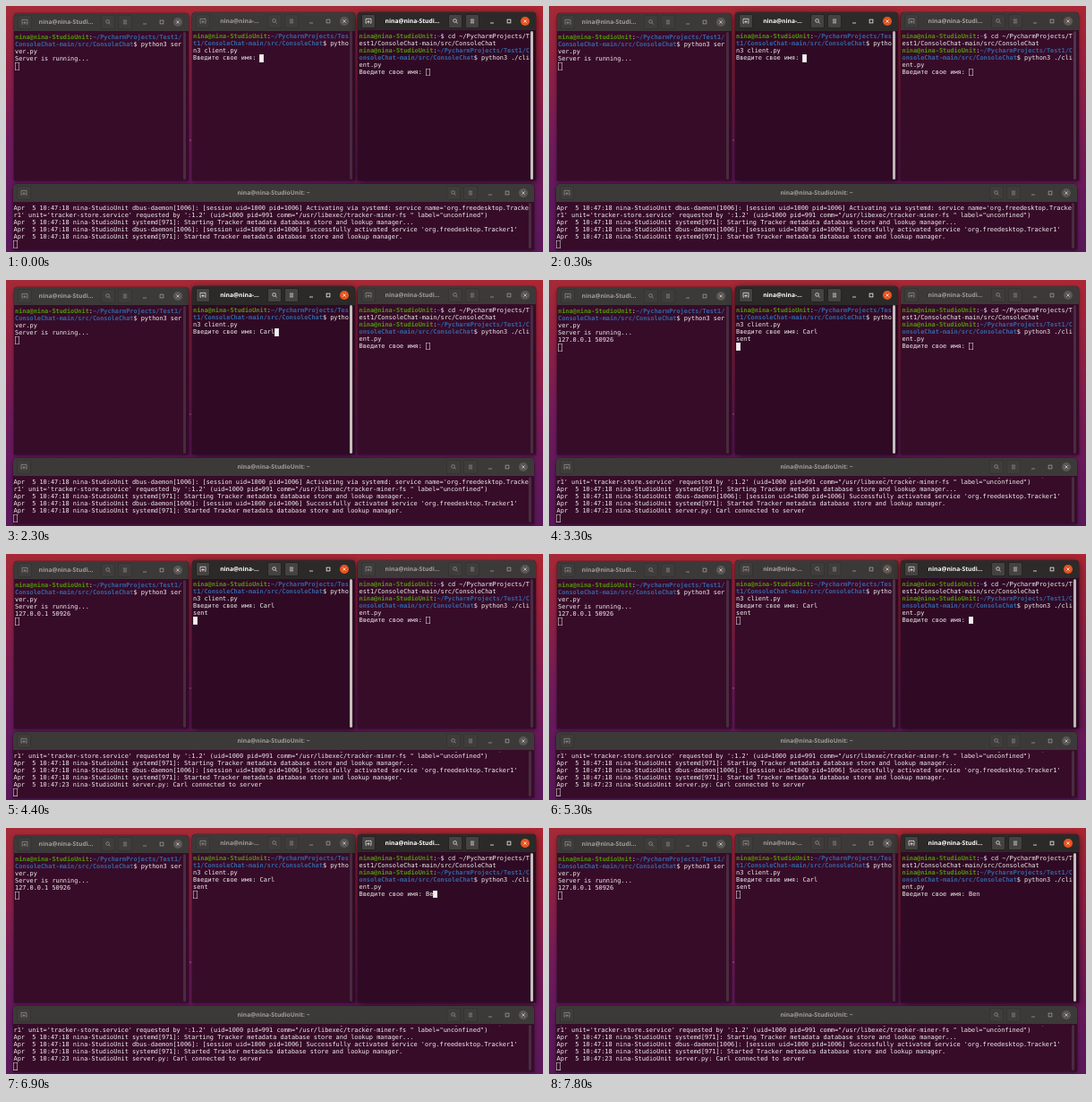
Recreate the animation shown at these times as an HTML page. Size 600 by 275 pixels, loop 8 s.

```html
<!DOCTYPE html>
<html lang="ru">
<head>
<meta charset="utf-8">
<title>Console chat</title>
<style>
@property --a { syntax: "<number>"; inherits: true; initial-value: 0; }
* { box-sizing: border-box; }
html, body { margin: 0; width: 100%; height: 100%; overflow: hidden; }
body {
  --cw: 4.142px; --lh: 8.05px; --loop: 8s step-end infinite;
  background:
    radial-gradient(circle at 206px 150px, #b04a88 0 .6px, transparent 1px),
    radial-gradient(circle at 100% 0, #c01c2844, transparent 260px),
    linear-gradient(#a52a36, #8e2045 25%, #701b5a 55%, #5e195c 80%, #5a1858);
  text-rendering: geometricPrecision;
}
.win {
  --p: calc(var(--a) * 100%);
  position: absolute; border-radius: 4px 4px 0 0;
  background: color-mix(in srgb, #300a24 var(--p), #370c29);
  box-shadow: 0 0 0 .5px #0004, 0 2px calc(4px + 5px * var(--a)) rgb(0 0 0 / calc(.4 + .25 * var(--a)));
}
.head {
  position: absolute; inset: 0 0 auto; height: 20.5px;
  border-radius: 4px 4px 0 0;
  background: color-mix(in srgb, #2b2a29 var(--p), #3c3a39);
  color: color-mix(in srgb, #fff var(--p), #a09c99);
}
.title {
  position: absolute; top: 0; width: 120px; margin-left: -60px;
  text-align: center; white-space: pre;
  font: bold 6.7px/20.5px "Open Sans", "Noto Sans", sans-serif;
}
.btn {
  position: absolute; width: 16px; height: 16px; top: 2.2px; margin-left: -8px;
  border-radius: 2px;
}
.box {
  background: color-mix(in srgb, #454341 var(--p), #3f3d3c);
  border: .5px solid color-mix(in srgb, #242322 var(--p), #363433);
}
.btn svg { position: absolute; inset: 0; width: 100%; height: 100%; fill: none; stroke: currentColor; stroke-width: .75; }
.close { color: color-mix(in srgb, #fff var(--p), #d6d3d1); }
.close::before {
  content: ""; position: absolute; inset: 3.2px; border-radius: 50%;
  background: color-mix(in srgb, #e9541f var(--p), #5a5755);
}
.bar {
  position: absolute; top: 21px; bottom: 1px; right: 2.6px; width: 3px; border-radius: 1.5px;
  background: color-mix(in srgb, #c4bfbd var(--p), #4a2c40);
}
.term {
  position: absolute; color: #f1efee; white-space: pre;
  font: 6.88px/var(--lh) "DejaVu Sans Mono", monospace;
}
.term div { height: var(--lh); }
.term b { color: #4e9a06; }
.term i { color: #3465a4; font-style: normal; font-weight: bold; }
.cur {
  position: absolute; width: calc(var(--cw) + .7px); height: calc(var(--lh) + .6px);
  left: calc(var(--cw) * var(--c, 0) - .2px); top: calc(var(--lh) * var(--r, 0) - .2px);
  box-shadow: inset 0 0 0 .6px #d5cfd2;
}
.typed { display: inline-block; height: var(--lh); overflow: hidden; vertical-align: top; }
.clip { position: absolute; overflow: hidden; inset: 22.5px 0 0; }

#mid { animation: focusMid var(--loop); }
#right { animation: focusRight var(--loop); }
#mid .typed { animation: typeMid var(--loop); }
#right .typed { animation: typeRight var(--loop); }
#mid .cur { animation: moveMid var(--loop), blinkMid var(--loop); }
#right .cur { animation: moveRight var(--loop), blinkRight var(--loop); }
#left .cur { animation: moveLeft var(--loop); }
.late { animation: appear var(--loop); }
#log .term { animation: scroll var(--loop); }
#log .cur { animation: moveLog var(--loop); }

@keyframes focusMid {
  0% { --a: 0; } 1.25% { --a: .4; } 2.5% { --a: .75; } 3.75% { --a: .94; } 5% { --a: .98; } 6.25% { --a: 1; }
  63.75% { --a: .6; } 65% { --a: .25; } 66.25% { --a: .06; } 67.5% { --a: .02; } 68.75%, 100% { --a: 0; }
}
@keyframes focusRight {
  0% { --a: 1; } 1.25% { --a: .6; } 2.5% { --a: .25; } 3.75% { --a: .06; } 5% { --a: .02; } 6.25% { --a: 0; }
  63.75% { --a: .4; } 65% { --a: .75; } 66.25% { --a: .94; } 67.5% { --a: .98; } 68.75%, 100% { --a: 1; }
}
@keyframes typeMid {
  0% { width: 0; } 17.5% { width: var(--cw); } 21.25% { width: calc(2 * var(--cw)); }
  25% { width: calc(3 * var(--cw)); } 28.75%, 100% { width: calc(4 * var(--cw)); }
}
@keyframes typeRight {
  0% { width: 0; } 78.75% { width: var(--cw); } 86.25% { width: calc(2 * var(--cw)); }
  90%, 100% { width: calc(3 * var(--cw)); }
}
@keyframes moveMid {
  0% { --c: 18; --r: 3; } 17.5% { --c: 19; --r: 3; } 21.25% { --c: 20; --r: 3; }
  25% { --c: 21; --r: 3; } 28.75% { --c: 22; --r: 3; } 41.25%, 100% { --c: 0; --r: 5; }
}
@keyframes moveRight {
  0% { --c: 18; --r: 5; } 78.75% { --c: 19; --r: 5; } 86.25% { --c: 20; --r: 5; }
  90%, 100% { --c: 21; --r: 5; }
}
@keyframes moveLeft { 0% { --r: 4; } 41.25%, 100% { --r: 5; } }
@keyframes moveLog { 0% { --r: 5; } 41.25%, 100% { --r: 6; } }
@keyframes blinkMid {
  0%, 15%, 40%, 55% { background: #f1efee; opacity: 1; }
  7.5%, 35%, 47.5% { background: #f1efee; opacity: 0; }
  62.5%, 100% { background: transparent; opacity: 1; }
}
@keyframes blinkRight {
  0% { background: transparent; opacity: 1; }
  62.5%, 76.25% { background: #f1efee; opacity: 1; }
  68.75%, 97.5%, 100% { background: #f1efee; opacity: 0; }
}
@keyframes appear { 0% { visibility: hidden; } 41.25%, 100% { visibility: visible; } }
@keyframes scroll { 0% { transform: none; } 41.25%, 100% { transform: translateY(calc(-1 * var(--lh))); } }
</style>
</head>
<body>
<script>
const user = 'nina', host = 'nina-StudioUnit', who = `${user}@${host}`;
const prompt = path => `<b>${who}</b>:<i>${path}</i>`;
const stamp = (sec, text) => `Apr  5 10:47:${sec} ${host} ${text}`;

const icons = {
  tab: '<path d="M5.6 10.6H4.6V5H11.4V10.6H10.4M8 6.8V10.8M6 8.8H10"/>',
  find: '<circle cx="7.5" cy="7.3" r="2.1"/><path d="M9.1 8.9L11 10.8"/>',
  menu: '<path d="M5.6 5.9H10.4M5.6 8H10.4M5.6 10.1H10.4"/>',
  min: '<path d="M6 10H10"/>',
  max: '<rect x="6.1" y="6.1" width="3.8" height="3.8"/>',
  close: '<path d="M6.4 6.4L9.6 9.6M9.6 6.4L6.4 9.6"/>'
};
const button = (name, x, cls = '') =>
  `<span class="btn ${cls}" style="left:${x}px"><svg viewBox="0 0 16 16">${icons[name]}</svg></span>`;

// tx, ty: text origin inside the window; mid: title centre
function addWindow({ id, x, y, w, h, title, mid, tx, ty, lines }) {
  const rows = lines.map(l => `<div>${l}</div>`).join('');
  document.body.insertAdjacentHTML('beforeend', `
    <section class="win" id="${id}" style="left:${x}px;top:${y}px;width:${w}px;height:${h}px">
      <div class="head">
        ${button('tab', 12, 'box')}
        <span class="title" style="left:${mid}px">${title}</span>
        ${button('find', w - 90, 'box')}${button('menu', w - 70.5, 'box')}
        ${button('min', w - 49)}${button('max', w - 30)}${button('close', w - 11.5, 'close')}
      </div>
      <div class="clip"><div class="term" style="left:${tx}px;top:${ty - 22.5}px">${rows}<span class="cur"></span></div></div>
      <div class="bar"></div>
    </section>`);
}

addWindow({
  id: 'left', x: 8.5, y: 7.7, w: 195, h: 187.3, title: `${user}@${user}-Studi…`, mid: 58.5, tx: 1.5, ty: 23.2,
  lines: [
    prompt('~/PycharmProjects/Test1/'),
    '<i>ConsoleChat-main/src/ConsoleChat</i>$ python3 ser',
    'ver.py',
    'Server is running...',
    '<span class="late">127.0.0.1 50926</span>'
  ]
});
addWindow({
  id: 'mid', x: 208, y: 7, w: 181.5, h: 188, title: `${user}@${user}-…`, mid: 53, tx: 1, ty: 23,
  lines: [
    prompt('~/PycharmProjects/Tes'),
    '<i>t1/ConsoleChat-main/src/ConsoleChat</i>$ pytho',
    'n3 client.py',
    'Введите свое имя: <span class="typed">Carl</span>',
    '<span class="late">sent</span>'
  ]
});
addWindow({
  id: 'right', x: 393, y: 6.7, w: 198.5, h: 188.3, title: `${user}@${user}-Studi…`, mid: 61, tx: 1.5, ty: 22.9,
  lines: [
    prompt('~') + '$ cd ~/PycharmProjects/T',
    'est1/ConsoleChat-main/src/ConsoleChat',
    prompt('~/PycharmProjects/Test1/C'),
    '<i>onsoleChat-main/src/ConsoleChat</i>$ python3 ./cli',
    'ent.py',
    'Введите свое имя: <span class="typed">Ben</span>'
  ]
});
addWindow({
  id: 'log', x: 8, y: 198.8, w: 581.5, h: 73, title: `${who}: ~`, mid: 291, tx: .5, ty: 23.2,
  lines: [
    stamp(18, "dbus-daemon[1006]: [session uid=1000 pid=1006] Activating via systemd: service name='org.freedesktop.Tracke"),
    `r1' unit='tracker-store.service' requested by ':1.2' (uid=1000 pid=991 comm="/usr/libexec/tracker-miner-fs " label="unconfined")`,
    stamp(18, 'systemd[971]: Starting Tracker metadata database store and lookup manager...'),
    stamp(18, "dbus-daemon[1006]: [session uid=1000 pid=1006] Successfully activated service 'org.freedesktop.Tracker1'"),
    stamp(18, 'systemd[971]: Started Tracker metadata database store and lookup manager.'),
    `<span class="late">${stamp(23, 'server.py: Carl connected to server')}</span>`
  ]
});
</script>
</body>
</html>
```
